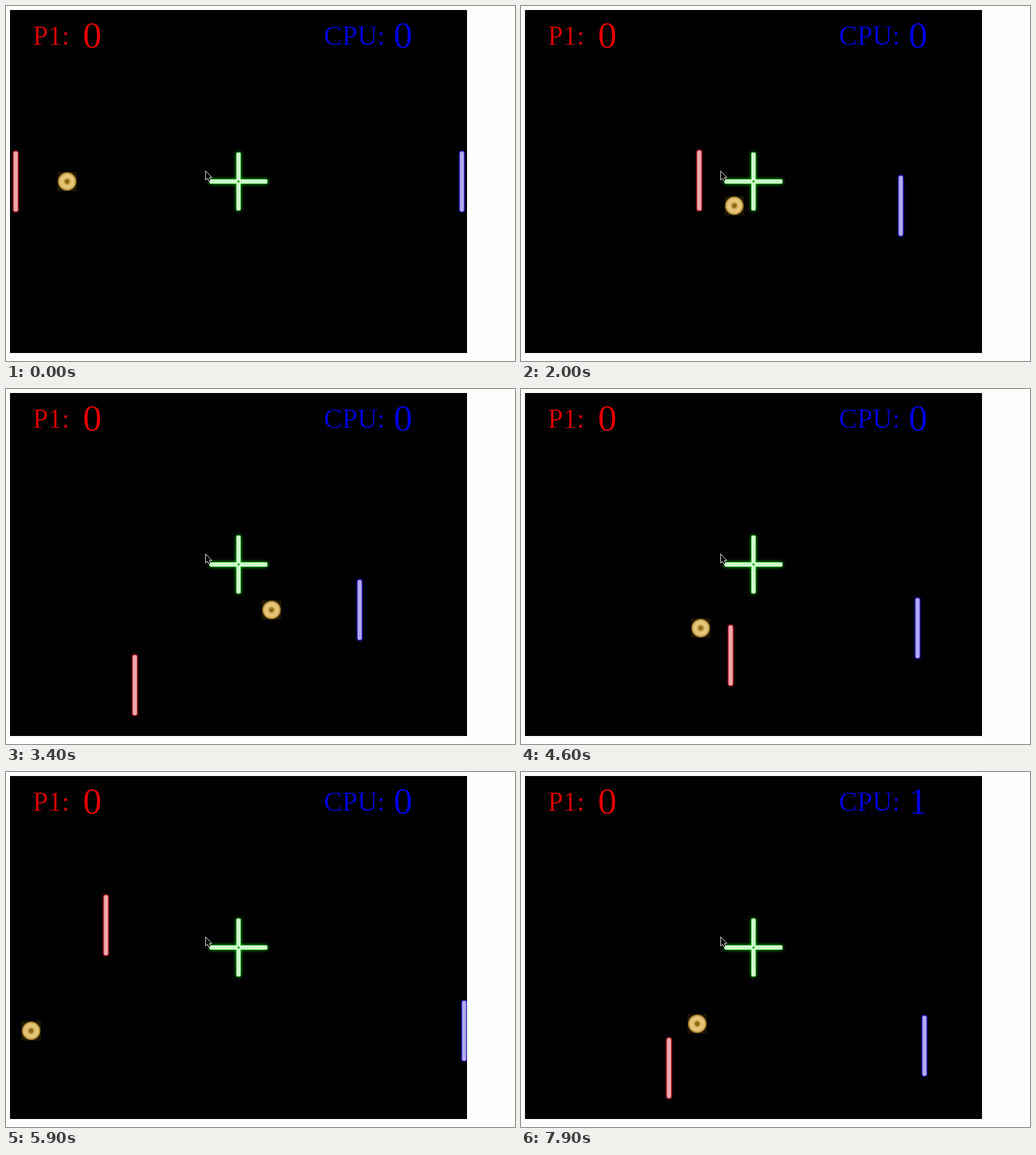
Write an HTML page with a canvas that moves like this. It is 891 px wide and 621 px high and loops after 8 s.

```html
<!DOCTYPE html>
<html lang="en">
<head>
<meta charset="utf-8">
<title>Paddle game</title>
<style>
  html, body { margin: 0; width: 100%; height: 100%; overflow: hidden; background: #fefefe; }
  canvas { display: block; }
</style>
</head>
<body>
<canvas id="stage" width="891" height="621"></canvas>
<script>
const ctx = document.getElementById('stage').getContext('2d');
const LOOP = 8000, TICK = 100, SERVE = 6000;
const DRIFT = 0.0265; // downward ball speed in pixels per millisecond

const clamp = (v, lo, hi) => Math.min(hi, Math.max(lo, v));

// Splits sorted keys [time, ...values] at t: index of the segment and progress in it.
function locate(keys, t) {
  const found = keys.findIndex(key => key[0] > t);
  const i = found < 0 ? keys.length - 2 : Math.max(0, found - 1);
  return [i, clamp((t - keys[i][0]) / (keys[i + 1][0] - keys[i][0]), 0, 1)];
}

// Straight flight between hits.
function straight(keys, t, axis) {
  const [i, k] = locate(keys, t);
  return keys[i][axis] + (keys[i + 1][axis] - keys[i][axis]) * k;
}

// Smooth hand movement through the keys, at rest at both ends.
function smooth(keys, t, axis) {
  const [i, k] = locate(keys, t);
  const span = keys[i + 1][0] - keys[i][0];
  const slope = j => {
    const before = keys[j - 1], after = keys[j + 1];
    return before && after ? (after[axis] - before[axis]) / (after[0] - before[0]) : 0;
  };
  const ease = k * k * (3 - 2 * k);
  return keys[i][axis] * (1 - ease) + keys[i + 1][axis] * ease
    + span * k * (1 - k) * (slope(i) * (1 - k) - slope(i + 1) * k);
}

const firstHits = [[400, 107], [900, 104], [1300, 190], [1400, 234], [2700, 536],
  [2800, 540], [4900, 277], [5000, 230], [5900, 44]];
const firstHand = [[400, 17, 307], [1400, 202.5, 307], [2100, 322, 307], [2600, 293, 335],
  [3000, 228, 420], [3400, 225.5, 518], [3700, 289, 534], [4200, 379, 492],
  [4600, 367, 466], [4900, 302, 401], [5900, 175, 268]];
const secondHits = [[6500, 124, 324], [7200, 150, 343], [7900, 308.5, 440.5]];
const secondHand = [[6500, 23, 361], [7400, 159, 436], [7900, 259, 518]];

// The computer follows the ball's height and mirrors it at half the horizontal speed.
function sceneAt(t) {
  const first = t < SERVE;
  const hand = first ? firstHand : secondHand;
  const x = straight(first ? firstHits : secondHits, t, 1);
  const y = first ? 307 + DRIFT * Math.max(0, t - 400) : straight(secondHits, t, 2);
  return {
    score: first ? 0 : 1,
    ball: [x, y],
    player: [smooth(hand, t, 1), smooth(hand, t, 2)],
    cpu: [Math.min(802, (first ? 851.5 : 860.5) - x / 2), y + (first ? 0 : 38.5)]
  };
}

function glow(color, blur) {
  ctx.shadowColor = color;
  ctx.shadowBlur = blur;
}

function bar(x, y, w, h, radius, color) {
  ctx.fillStyle = color;
  ctx.beginPath();
  ctx.roundRect(x - w / 2, y - h / 2, w, h, radius);
  ctx.fill();
}

// A dim outline softens the edges of the letters.
function label(text, x, y, size, color) {
  ctx.font = `${size}px "Liberation Serif", serif`;
  ctx.fillStyle = color;
  ctx.strokeStyle = 'rgba(0, 0, 0, 0.35)';
  ctx.lineWidth = 1;
  ctx.fillText(text, x, y);
  ctx.strokeText(text, x, y);
}

function paddle([x, y], edge, core) {
  glow(edge, 3);
  bar(x, y, 9.5, 107, 4, edge);
  glow('transparent', 0);
  bar(x, y, 7, 105, 3.5, core);
}

function cross(x, y) {
  const beams = (length, width, color) => {
    bar(x, y, width, length, 2, color);
    bar(x, y, length, width, 2, color);
  };
  glow('#00c800', 6);
  beams(102, 8, '#5cec5c');
  glow('transparent', 0);
  beams(100, 6.5, '#dcffd8');
  beams(94, 1, '#a8f8a0');
  bar(x, y, 4, 4, 2, '#20a820');
}

function ball([x, y]) {
  bar(x, y, 34, 34, 0, '#1e1600');
  const shade = ctx.createRadialGradient(x, y, 0, x, y, 17);
  [[0, '#805a08'], [0.17, '#94701c'], [0.36, '#dcb862'], [0.55, '#e8cc84'],
   [0.78, '#dcb868'], [0.9, '#a07c28'], [1, '#1e1600']]
    .forEach(([stop, color]) => shade.addColorStop(stop, color));
  bar(x, y, 34, 34, 17, shade);
}

function cursor() {
  ctx.fillStyle = '#000';
  ctx.strokeStyle = '#fff';
  ctx.lineWidth = 1;
  const arrow = new Path2D('M349.5 288.5V304.5L353 301.5L355.5 306.5L358.5 305.5L356 300H360.5Z');
  ctx.fill(arrow);
  ctx.stroke(arrow);
}

function draw(now) {
  const scene = sceneAt(Math.floor(now % LOOP / TICK) * TICK);
  ctx.fillStyle = '#fefefe';
  ctx.fillRect(0, 0, 891, 621);
  ctx.save();
  ctx.beginPath();
  ctx.rect(7, 7, 800, 600);
  ctx.clip();
  ctx.fillStyle = '#000';
  ctx.fillRect(7, 7, 800, 600);

  label('P1:', 47, 67.5, 48, '#e00000');
  label('0', 134.5, 72.5, 66, '#e80000');
  label('CPU:', 556.5, 67.5, 48, '#0000e0');
  label(scene.score, 678.5, 72.5, 66, '#0000e8');
  cross(407, 307);
  paddle(scene.player, '#c0202c', '#eea8aa');
  paddle(scene.cpu, '#2c1cc8', '#b2aaf0');
  ball(scene.ball);
  cursor();
  ctx.restore();
}

const start = performance.now();
function frame() {
  draw(performance.now() - start);
  requestAnimationFrame(frame);
}
frame();
</script>
</body>
</html>
```
